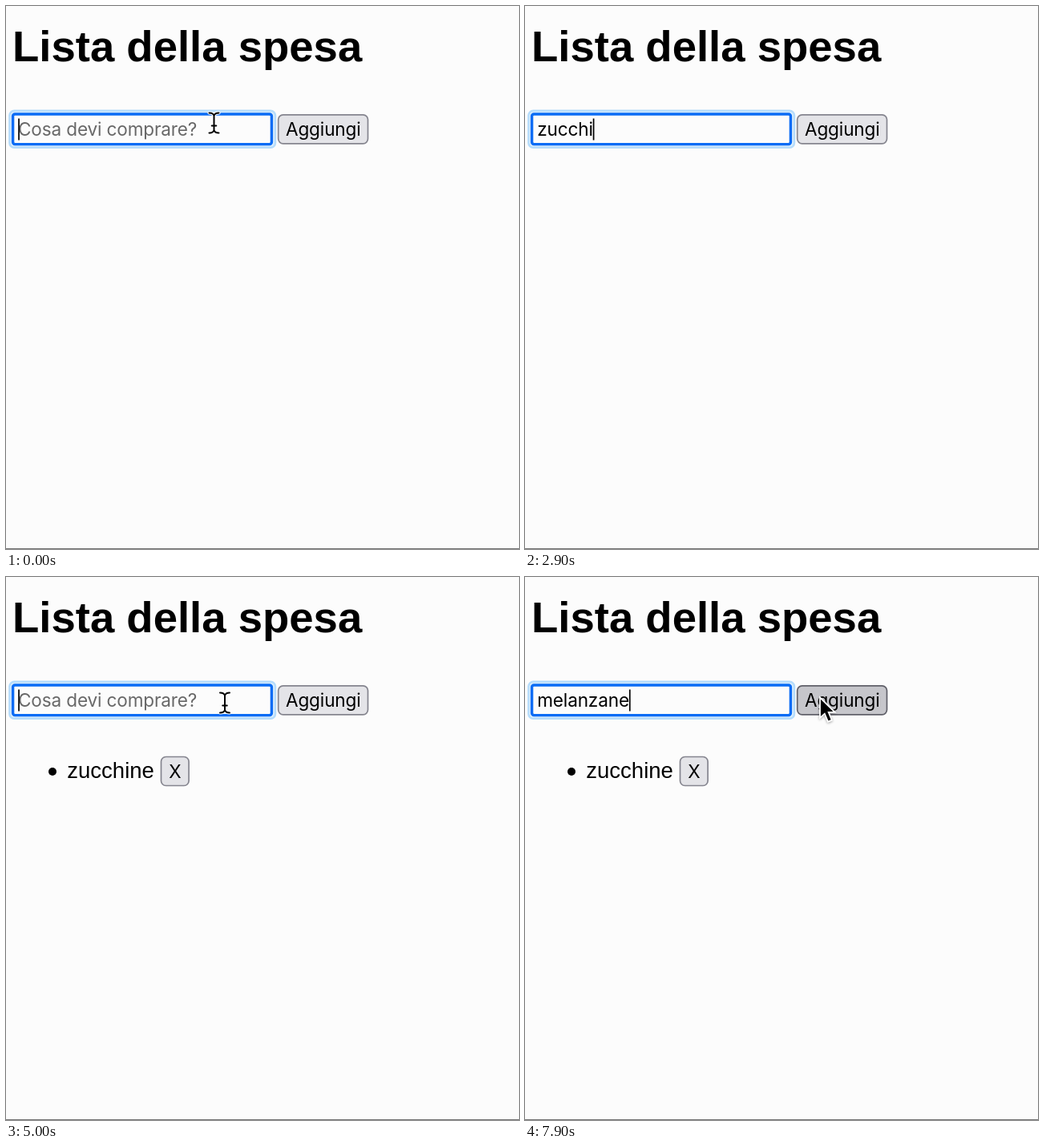
An HTML page that plays this animation: 640 by 678 pixels, repeating every 8000 ms.

```html
<!DOCTYPE html>
<html lang="it">
<head>
<meta charset="utf-8">
<title>Lista della spesa</title>
<style>
  html, body { margin: 0; width: 100%; height: 100%; overflow: hidden; background: #fcfcfc; }
  svg { display: block; width: 640px; height: 678px; }
  .ui { font: 22.6px Inter, sans-serif; letter-spacing: -.16px; }
  .page { font-family: "Liberation Sans", Arial, sans-serif; }
  .title { font-size: 54.5px; font-weight: bold; }
  .entry { font-size: 27.5px; }
  .button { fill: #e4e4e8; stroke: #85858f; stroke-width: 1.7; }
  .button.hover { fill: #c6c6cb; stroke: #606069; }
  .button.active { fill: #b1b1b9; stroke: #4d4d56; }
  #hint { fill: #686868; }
  #beam { fill: none; stroke-linecap: round; }
  .halo { stroke: #fff; stroke-width: 4.2; }
  .ink { stroke: #000; stroke-width: 2; }
  #arrow { stroke: #fff; stroke-width: 1.8; filter: drop-shadow(0 1.5px 1.5px rgba(0, 0, 0, .35)); }
</style>
</head>
<body>
<svg viewBox="0 0 640 678">
  <defs>
    <path id="beamShape" d="M-6-12.5Q-1-12.5 0-9Q1-12.5 6-12.5M0-9V9M-6 12.5Q-1 12.5 0 9Q1 12.5 6 12.5M-2.8 3.5H2.8"/>
  </defs>
  <g class="page">
    <text class="title" x="8" y="68.5">Lista della spesa</text>
    <g id="item">
      <circle cx="58" cy="243" r="5"/>
      <text class="entry" x="76.3" y="251">zucchine</text>
      <rect class="button" x="193.5" y="224.5" width="34.6" height="36" rx="6"/>
      <text class="ui" x="211" y="251" text-anchor="middle">X</text>
    </g>
  </g>
  <g class="ui">
    <rect id="blur" x="9" y="135.8" width="322" height="36" rx="3" fill="#fcfcfc" stroke="#8f8f9d" stroke-width="1.7"/>
    <g id="ring">
      <rect x="3.2" y="129.6" width="334" height="48.4" rx="7" fill="#b5dcfb"/>
      <rect x="5.6" y="132" width="329.2" height="43.6" rx="5" fill="#dceefc"/>
      <rect x="8.6" y="135" width="322.8" height="37.6" rx="2.5" fill="#fcfcfc" stroke="#0a6cf5" stroke-width="3.4"/>
    </g>
    <text id="hint" x="15" y="162">Cosa devi comprare?</text>
    <text id="typed" x="15.2" y="162"></text>
    <rect id="caret" y="140.5" width="1.7" height="27"/>
    <rect id="add" class="button" x="339.7" y="135.8" width="111.8" height="36" rx="6"/>
    <text x="349" y="162">Aggiungi</text>
  </g>
  <path d="M0 677.5H640" stroke="#777"/>
  <g id="beam">
    <use href="#beamShape" class="halo"/>
    <use href="#beamShape" class="ink"/>
  </g>
  <path id="arrow" d="M0 0V25.5L5.8 20.2L10 30.2L14.8 28.2L10.7 18.4H18.6Z"/>
</svg>
<script>
  const LOOP = 8000, STEP = 100, TEXT_X = 15.2;
  const $ = id => document.getElementById(id);

  const words = [
    { text: 'zucchine', keys: [2100, 2300, 2400, 2600, 2700, 2900, 3100, 3300], clear: 4300 },
    { text: 'melanzane', keys: [5300, 5600, 5800, 6100, 6400, 6600, 6800, 7000, 7200], clear: LOOP }
  ];
  const caretOff = [[300, 800], [1400, 1900], [3800, 4900]];
  // The pointer is hidden between "until" and the next "from".
  const moves = [
    { from: 0, to: 1, until: 2100, a: [259.5, 146], b: [259.5, 146] },
    { from: 3600, to: 4000, until: 4500, a: [259.5, 146], b: [364, 156] },
    { from: 4500, to: 4900, until: 5300, a: [364, 156], b: [273, 157] },
    { from: 7500, to: 7900, until: LOOP, a: [273, 157], b: [368, 150.5] }
  ];

  const within = (t, a, b) => t >= a && t < b;
  const show = (id, on) => $(id).setAttribute('visibility', on ? 'visible' : 'hidden');
  const ease = p => p * p * (3 - 2 * p);

  function typedAt(t) {
    const word = words.find(w => within(t, w.keys[0], w.clear));
    return word ? word.text.slice(0, word.keys.filter(k => k <= t).length) : '';
  }

  function pointerAt(t) {
    const m = moves.find(m => within(t, m.from, m.until));
    if (!m) return null;
    const p = ease(Math.min(1, (t - m.from) / (m.to - m.from)));
    return m.a.map((v, i) => v + (m.b[i] - v) * p);
  }

  function draw(t) {
    const text = typedAt(t), focused = !within(t, 4200, 4900);
    $('typed').textContent = text;
    show('hint', !text);
    show('ring', focused);
    show('blur', !focused);
    show('item', t >= 4300);
    show('caret', focused && !caretOff.some(([a, b]) => within(t, a, b)));
    $('caret').setAttribute('x', TEXT_X + (text ? $('typed').getComputedTextLength() : 0));

    const pos = pointerAt(t);
    const overField = pos && pos[0] < 332;
    const overAdd = pos && pos[0] > 339;
    show('beam', overField);
    show('arrow', pos && !overField);
    if (pos) for (const id of ['beam', 'arrow']) $(id).setAttribute('transform', `translate(${pos})`);
    const state = within(t, 4200, 4300) ? ' active' : ' hover';
    $('add').setAttribute('class', 'button' + (overAdd ? state : ''));
  }

  const start = performance.now();
  function tick() {
    const t = (performance.now() - start) % LOOP;
    draw(Math.floor(t / STEP) * STEP);
    requestAnimationFrame(tick);
  }
  tick();
</script>
</body>
</html>
```
